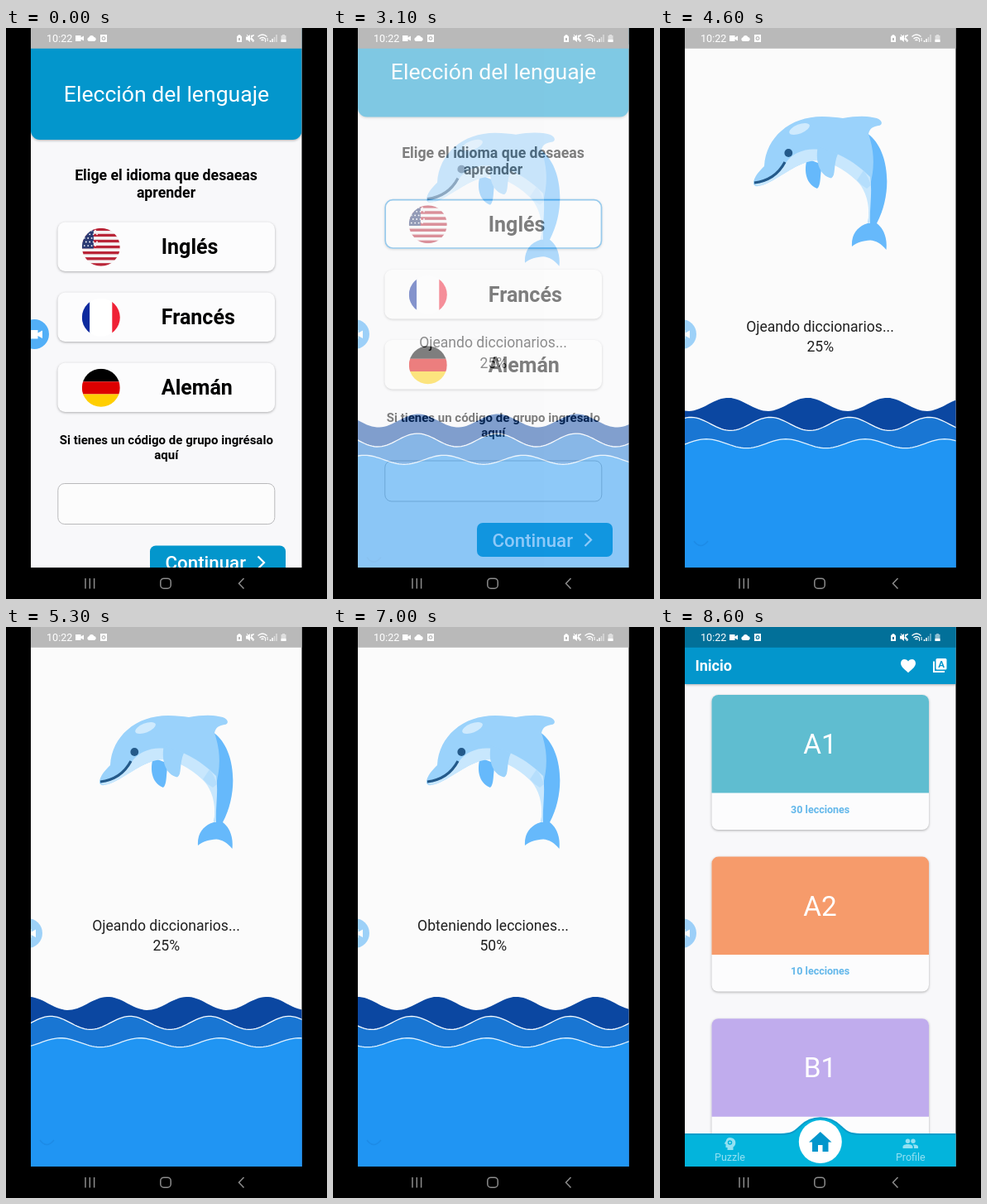
Write an HTML page that moves like this. It is 388x690 px and loops after 9600 ms.

```html
<!DOCTYPE html>
<html lang="es">
<head>
<meta charset="utf-8">
<title>Elección del lenguaje</title>
<style>
  html, body { margin: 0; width: 100%; height: 100%; overflow: hidden; background: #000; }
  svg { display: block; width: 100vw; height: 100vh; font-family: Roboto, sans-serif; }
  .mid { text-anchor: middle; }
  .bold { font-weight: 700; }
  .raised { filter: drop-shadow(0 1.5px 1.5px rgba(0, 0, 0, .3)); }
</style>
</head>
<body>
<svg viewBox="0 0 388 690">
  <defs>
    <clipPath id="screen"><rect x="30" width="327.5" height="652"/></clipPath>
    <clipPath id="disc"><circle r="23"/></clipPath>
  </defs>
  <rect width="388" height="690"/>
  <g clip-path="url(#screen)">

    <g id="pick">
      <rect x="30" width="328" height="652" fill="#f8f8fa"/>
      <g id="scroller">
        <path class="raised" d="M30 0H357.500V124a11 11 0 0 1-11 11H41a11 11 0 0 1-11-11Z" fill="#0396cc"/>
        <text class="mid" x="194" y="89" font-size="26.6" fill="#fff">Elección del lenguaje</text>
        <g class="mid bold">
          <text x="193.500" y="184" font-size="17.7">Elige el idioma que desaeas</text>
          <text x="193.500" y="204.500" font-size="17.7">aprender</text>
          <text x="193.800" y="503" font-size="15">Si tienes un código de grupo ingrésalo</text>
          <text x="193.800" y="521" font-size="15">aquí</text>
        </g>
        <g id="options"></g>
        <rect id="chosen" x="63.200" y="235.200" width="261.300" height="58.300" rx="9" fill="none" stroke="#3398dc" stroke-width="1.700"/>
        <rect x="62.800" y="550.500" width="262" height="49" rx="8" fill="#fcfcfc" stroke="#b9b9bb"/>
        <rect x="174" y="625.500" width="164" height="41" rx="7" fill="#0396cc"/>
        <text x="192.500" y="654" font-size="22.3" font-weight="500" fill="#fff">Continuar</text>
        <path d="M304.500 638.500l7.500 7.500-7.500 7.500" fill="none" stroke="#fff" stroke-width="2.200"/>
      </g>
    </g>

    <g id="load">
      <rect x="30" width="328" height="652" fill="#fbfbfb"/>
      <g id="dolphin">
        <path fill="#66b9fb" d="M250 127C276 144 283 196 262 236C270 242 275 253 273.500 268C267 260 261 257 254 256.500C246 257 238 259 232 264C231 250 238 240 251 236C255 220 252 180 240 150Z"/>
        <path fill="#66b9fb" d="M178 158C174 170 175 188 190 194C195 190 193 178 196 165Z"/>
        <path fill="#9ad2fb" d="M113 188C113 180 120 173 126 167C128 132 157 107 196 107C206 107 214 108 221 109C238 106 251 106 262 109C270 112 269 118 264 118C257 119 253 122 252 128C260 152 259 170 254 190C240 170 205 155 187 159C160 165 140 185 123 190Q114 193 113 188Z"/>
        <path fill="#c8e7fd" d="M114 189C133 186 146 175 152 163C160 151 176 145 192 147C215 148 238 164 254 180C257 199 253 218 254 236L251 236C255 213 248 194 237 184C220 168 198 157 182 161C160 166 142 184 124 190Q117 192 114 189Z"/>
        <path fill="#b5defc" d="M246 172Q252 180 255 190L250 194Q243 190 238 184Z"/>
        <path fill="#9ad2fb" d="M191 143C187 160 193 179 207 181.500C213 178 209 166 215 152Z"/>
        <path d="M114 187C131 185 143 177 151 162" fill="none" stroke="#245a8a" stroke-width="3.200"/>
        <circle cx="155.300" cy="151" r="4.900" fill="#245a8a"/>
        <ellipse rx="13" ry="5.500" transform="translate(168.500 122) rotate(-21)" fill="#cfeafd"/>
      </g>
      <g class="mid" font-size="17.600" fill="#202020">
        <text id="task" x="193.500" y="366.500"></text>
        <text id="percent" x="193.800" y="391"></text>
      </g>
      <g id="waves"></g>
      <path d="M41 620q8 11 17 0" fill="none" stroke="#1d8be6" stroke-width="1.500"/>
    </g>

    <g id="home">
      <rect x="30" width="328" height="652" fill="#f8f8fa"/>
      <g id="levels"></g>
      <rect class="raised" x="30" width="328" height="69" fill="#0396cc"/>
      <text class="bold" x="42.500" y="52.500" font-size="18" fill="#fff">Inicio</text>
      <path fill="#fff" d="M300 55.200C294 50 291 47.500 291 43.800C291 38.500 297 37.500 300 41.500C303 37.500 309 38.500 309 43.800C309 47.500 306 50 300 55.200Z"/>
      <path d="M331 41.500V54H344" fill="none" stroke="#fff" stroke-width="2"/>
      <rect x="333.500" y="38" width="13" height="13.500" rx="1.500" fill="#fff"/>
      <text class="mid bold" x="340" y="49" font-size="11.500" fill="#0396cc">A</text>
      <path fill="#03b4dc" stroke="#0a9dcb" stroke-width="2" d="M26 613H146C162 613 164 608 170 603C183 590 205 590 218 603C224 608 226 613 242 613H362V660H26Z"/>
      <circle cx="193.800" cy="622" r="26" fill="#fff"/>
      <path fill="#0396cc" d="M193.800 610L180 622.500H184V634H191V626H196.500V634H203.500V622.500H207.500Z"/>
      <g fill="#94e1f2">
        <path d="M84.500 617c8 0 8.500 9 4 11.500v3.500h-7v-3h-2v-4l-1.800-.8 2-3c.4-2.600 2.400-4.200 4.800-4.200Z"/>
        <circle cx="299.500" cy="621.300" r="2.700"/><circle cx="306" cy="621.300" r="2.700"/>
        <path d="M293.500 630v-2c0-4 12-4 12 0v2ZM307 630v-2.500l-1.500-2.300c3 0 6.500.8 6.500 2.800v2Z"/>
        <g class="mid" font-size="12.500"><text x="84.500" y="644.500">Puzzle</text><text x="302.800" y="644.500">Profile</text></g>
      </g>
      <circle cx="84.500" cy="623" r="2" fill="none" stroke="#03b4dc" stroke-width="1.500"/>
    </g>

    <rect id="bar" x="30" width="328" height="24.800"/>
    <g fill="#fff">
      <text x="49" y="17" font-size="12.600">10:22</text>
      <path d="M84 9h6.500v2.500l3.500-2v6l-3.500-2V16H84Z"/>
      <path d="M100 16a2.500 2.500 0 0 1 .3-4.800a3.400 3.400 0 0 1 6.200-.3a2.600 2.600 0 0 1 .3 5.100Z"/>
      <path fill-rule="evenodd" d="M114 8h8v9h-8ZM118 10a2.500 2.500 0 1 0 .01 0Z"/>
      <circle cx="118" cy="12.500" r="1.200"/>
      <path fill-rule="evenodd" d="M279 10.500q3-5 6 0v6.500h-6ZM281 12v3h2v-3Z"/>
      <path d="M290 10.500h2l3-2.500v9l-3-2.500h-2ZM296 9l4-1v1l-3 2.500 3 3.500v1.500l-4-3Z"/>
      <path d="M291 8l8 9" stroke="#fff"/>
      <path d="M304.500 10.500q5.500-5 11 0M306.500 13q3.500-3 7 0M308.500 15q1.500-1.300 3 0" fill="none" stroke="#fff" stroke-width="1.400"/>
      <path d="M313.500 13v4M316 12v4" stroke="#fff"/>
      <path d="M319.500 17v-2M322 17v-4" stroke="#fff" stroke-width="1.500"/>
      <path d="M324.500 17v-6M327 17v-9" stroke="#fff" stroke-width="1.500" opacity=".5"/>
      <path d="M332.500 9h1.500V8h3v1h1.500v8h-6Z" opacity=".55"/>
      <path d="M332.500 14h6v3h-6Z"/>
    </g>

    <g id="recorder">
      <circle cx="34" cy="370" r="18" fill="#52aff7"/>
      <path fill="#fff" d="M26 365h12.500v3.500l5.500-3v9.500l-5.500-3v3.500H26Z"/>
    </g>
  </g>

  <g fill="none" stroke="#8c8c8c" stroke-width="1.500">
    <path d="M96 665v12.500M101.300 665v12.500M106.600 665v12.500"/>
    <rect x="186.800" y="665.200" width="12.400" height="12" rx="4"/>
    <path d="M287.500 665l-6 6.300 6 6.300"/>
  </g>
</svg>
<script>
const LOOP = 9600, STEP = 100;
const $ = id => document.getElementById(id);
const range = n => [...Array(n).keys()];
const bar = (x, y, w, h, fill) => `<rect x="${x}" y="${y}" width="${w}" height="${h}" fill="${fill}"/>`;

const stripes = range(13).map(i => bar(-23, -23 + i * 46 / 13, 46, 3.6, i % 2 ? "#f6f3f4" : "#b92538")).join("");
const stars = range(20).map(i =>
  `<circle cx="${-20 + i % 4 * 4.4 + (i >> 2) % 2 * 2}" cy="${-20 + (i >> 2) * 4.6}" r=".9" fill="#fff"/>`).join("");
const languages = [
  ["Inglés", stripes + bar(-23, -23, 37 - 23, 24.8, "#2b3a73") + stars],
  ["Francés", bar(-23, -23, 9.5, 46, "#0c2a9e") + bar(-13.5, -23, 27, 46, "#fff") + bar(13.5, -23, 10, 46, "#ef2136")],
  ["Alemán", bar(-23, -23, 46, 15.6, "#000") + bar(-23, -7.4, 46, 15.2, "#dd0000") + bar(-23, 7.8, 46, 16, "#ffce00")],
];
$("options").innerHTML = languages.map(([name, flag], i) => `<g transform="translate(0 ${i * 85})">
  <rect class="raised" x="62.5" y="234.5" width="262.500" height="59.500" rx="9" fill="#fcfcfd"/>
  <g transform="translate(114.800 264.700)" clip-path="url(#disc)">${flag}</g>
  <text class="bold" x="187.800" y="273.300" font-size="25">${name}</text></g>`).join("");

const levels = [["A1", "#5fbdd0", "30 lecciones"], ["A2", "#f69b6b", "10 lecciones"], ["B1", "#c0aced", ""]];
$("levels").innerHTML = levels.map(([name, color, count], i) => `<g class="mid" transform="translate(0 ${i * 195.6})">
  <rect class="raised" x="62.500" y="82" width="262.500" height="163" rx="8" fill="#fcfcfd"/>
  <path d="M62.500 200.500V90a8 8 0 0 1 8-8H317a8 8 0 0 1 8 8V200.500Z" fill="${color}"/>
  <text x="193.500" y="153" font-size="33.300" fill="#fff">${name}</text>
  <text class="bold" x="193.700" y="224.800" font-size="12.500" fill="#62b7ea">${count}</text></g>`).join("");

// Peak is the crest position at 3800 ms; speed is in px per second.
const waves = [
  { y: 454.9, amp: 8, peak: 36, speed: 58, fill: "#0b47a1" },
  { y: 478.4, amp: 8, peak: 18, speed: 24, fill: "#1976d3", line: "#f4faff" },
  { y: 502.2, amp: 5.500, peak: 45, speed: 14, fill: "#2095f3", line: "#dff1ff" },
];
$("waves").innerHTML = waves.map(w =>
  `<path fill="${w.fill}" stroke="${w.line || "none"}" stroke-width="1.300"/>`).join("");
const wavePaths = [...$("waves").children];

function drawWaves(t) {
  waves.forEach((w, i) => {
    const crest = w.peak + w.speed * (t - 3800) / 1000;
    const points = range(113).map(k => {
      const x = 26 + k * 3;
      return `${x} ${(w.y - w.amp * Math.cos((x - crest) * 2 * Math.PI / 96)).toFixed(2)}`;
    });
    wavePaths[i].setAttribute("d", `M${points.join("L")}V660H26Z`);
  });
}

// The waves stall while the next content is loading.
function waveTime(t) {
  if (t < 3600) return 3300;
  if (t >= 7700 && t < 8200) return 7600;
  return Math.min(t, 8200);
}

const show = (id, on) => $(id).setAttribute("display", on ? "inline" : "none");
const shift = (id, x, y) => $(id).setAttribute("transform", `translate(${x} ${y})`);

function render(t) {
  const enter = Math.min(1, Math.max(0, (t - 2900) / 400));
  const tuck = Math.min(1, t / 200);
  const atHome = t >= 8600;

  show("pick", enter < 1);
  show("load", enter > 0 && !atHome);
  show("home", atHome);
  show("chosen", t >= 600);
  shift("scroller", 0, t >= 1600 ? -27.5 : 0);

  $("load").setAttribute("opacity", enter);
  shift("load", 0, 157 * (1 - enter) ** 3);
  $("task").textContent = t < 5700 ? "Ojeando diccionarios..." : "Obteniendo lecciones...";
  $("percent").textContent = t < 5700 ? "25%" : t < 8200 ? "50%" : "75%";
  drawWaves(waveTime(t));

  $("bar").setAttribute("fill", atHome ? "#027099" : "#b9b9b9");
  shift("recorder", -8 * tuck, 0);
  $("recorder").setAttribute("opacity", 1 - .45 * tuck);
}

const start = performance.now();
let last = -1;
function tick() {
  const t = Math.floor((performance.now() - start) % LOOP / STEP) * STEP;
  if (t !== last) render(last = t);
  requestAnimationFrame(tick);
}
tick();
</script>
</body>
</html>
```
